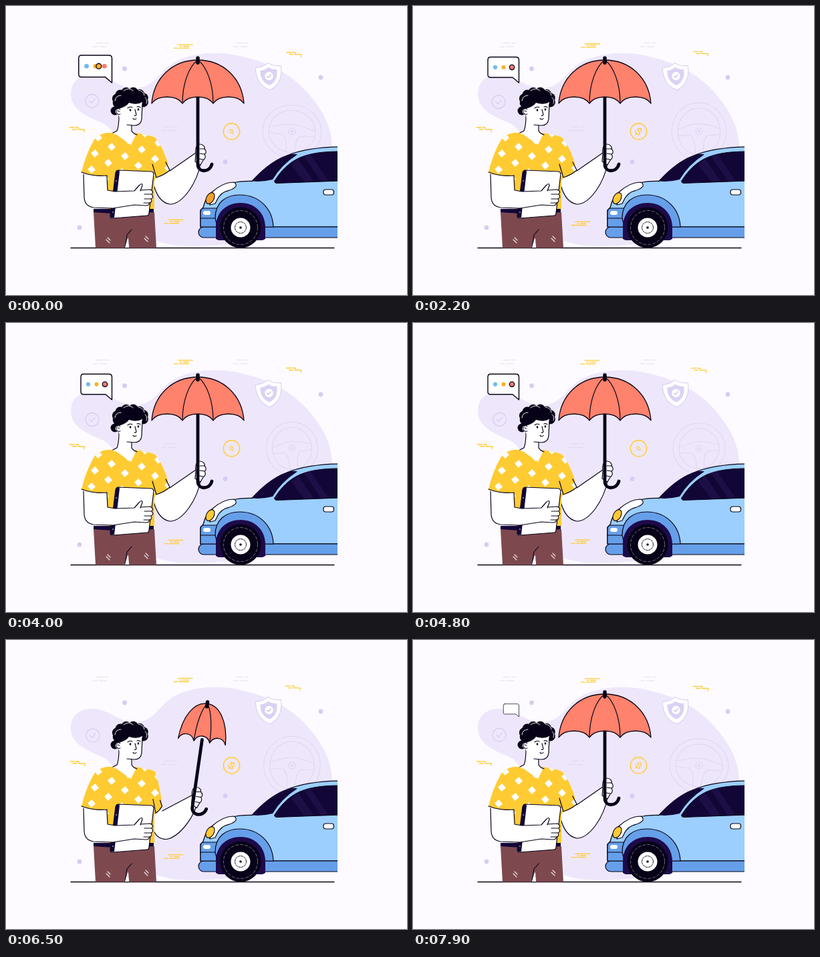
Animation, 600 px wide and 433 px high, one loop 8 s. Source, as an HTML page with a canvas:

```html
<!DOCTYPE html>
<html lang="en">
<head>
<meta charset="utf-8">
<title>Car insurance</title>
<style>
html, body { margin: 0; width: 100%; height: 100%; overflow: hidden; background: #fdfbff; }
canvas { display: block; width: 600px; height: 433px; }
</style>
</head>
<body>
<canvas id="stage"></canvas>
<script>
const W = 600, H = 433, LOOP = 8000, STEP = 100, TAU = Math.PI * 2;
const INK = '#120637', BLACK = '#070217', WHITE = '#fff', SKY = '#9ccffd', BLUE = '#669fe9',
  YELLOW = '#ffcb32', CORAL = '#fe826c', LILAC = '#eee7fb', MAUVE = '#d8ccf2', BROWN = '#7d494f', GREY = '#e2deea';
const canvas = document.getElementById('stage');
const g = canvas.getContext('2d');
const dpr = window.devicePixelRatio || 1;
canvas.width = W * dpr;
canvas.height = H * dpr;

function shape(d, fill, stroke, width = 1.3) {
  const p = d instanceof Path2D ? d : new Path2D(d);
  if (fill) { g.fillStyle = fill; g.fill(p); }
  if (stroke) { g.strokeStyle = stroke; g.lineWidth = width; g.stroke(p); }
}
const line = (d, color = BLACK, width = 1.2) => shape(d, null, color, width);

function oval(x, y, rx, ry, fill, stroke, width, turn = 0) {
  const p = new Path2D();
  p.ellipse(x, y, rx, ry, turn, 0, TAU);
  shape(p, fill, stroke, width);
}
const disc = (x, y, r, fill, stroke, width) => oval(x, y, r, r, fill, stroke, width);

function dashed(x, y, r, color, width, ...dash) {
  g.setLineDash(dash);
  disc(x, y, r, null, color, width);
  g.setLineDash([]);
}

function box(x, y, w, h, r, fill, stroke, width) {
  const p = new Path2D();
  p.roundRect(x, y, w, h, r);
  shape(p, fill, stroke, width);
}

function layer(x, y, turn, draw) {
  g.save();
  g.translate(x, y);
  g.rotate(turn);
  draw();
  g.restore();
}

// Eased 0..1 between two times
function ramp(t, a, b) {
  const k = Math.min(1, Math.max(0, (t - a) / (b - a)));
  return k * k * (3 - 2 * k);
}
const wave = (t, period, shift = 0) => Math.cos((t - shift) / period * TAU);
const mix = (a, b, k) => a + (b - a) * k;

function threeBars(x, y) {
  layer(x, y, 0, () => line('M-8-2.600H14M0 0H8M-5 0H-3M-14 2.600H-8M-6 2.600H8', YELLOW, 1.3));
}
function stepBars(x, y) {
  layer(x, y, 0, () => line('M-11-3H-4M-2-3H2V0H11V3.500M-7 0H-1', YELLOW, 1.3));
}
function greyBars(x, y, color = GREY) {
  layer(x, y, 0, () => line('M-7-3H3M6-3H11M-12 2.500H-5M-2 2.500H9', color, 1));
}

function background(t) {
  const slow = wave(t, LOOP), lift = 1 - slow;
  g.fillStyle = '#fdfbff';
  g.fillRect(0, 0, W, H);
  shape('M97 132C97 113 111 102 130 103C154 104 166 121 190 123C224 124 228 96 254 83' +
    'C285 68 326 67 358 77C405 87 440 112 462 143C478 164 488 186 488 212V300C450 350 330 362 260 359' +
    'C215 356 185 335 176 290C170 240 176 194 146 176C118 165 97 154 97 132Z', LILAC);
  [[177.5, 94], [471, 107], [328, 233.5], [110, 332]].forEach(([x, y]) => disc(x, y, 3.4, MAUVE));

  const sway = -2 + 1.7 * wave(t, 2000);
  threeBars(265.5 + sway * .15, 60.5 - lift);
  threeBars(251 + sway * .1, 323 + lift * 2.5);
  stepBars(431 + sway, 72.5 - lift);
  stepBars(106 - sway * .5, 185);
  greyBars(142, 58.5);
  greyBars(352, 58.5);
  greyBars(245, 184, '#dfd7ee');

  layer(129 - Math.sin(t / LOOP * TAU), 143.5 - 1.2 * slow, 0, () => {
    disc(0, 0, 10, null, MAUVE, 1.2);
    line('M-4 0L-1 3L4-3', MAUVE, 1.2);
  });

  disc(337.5, 188, 12.2, null, YELLOW, 1.4);
  dashed(337.5, 188, 10.5, '#ffdc7d', .6, 1.5, 2);
  layer(337.5, 188, .75, () => {
    g.scale(1, .7 + .3 * wave(t, 5000, 2000));
    line('M3.500-2.500C2-5-4-5-3.500-2C-3 1 4-1 4 2C4 5-3 5-4 2.500M0-6.500V-4M0 4V6.500', YELLOW, 1.4);
  });

  layer(393.5, 105, -.08, () => {
    const d = 'M0-20C6-15 13-14 19-14C20 3 14 15 0 21C-14 15-20 3-19-14C-13-14-6-15 0-20Z';
    shape(d, WHITE, MAUVE, 1);
    g.scale(.66, .66);
    shape(d, '#dcd1f4');
    g.scale(1.5, 1.5);
    disc(0, 0, 6.3, WHITE);
    line('M-3 0L-1 2L3-2', '#c3b6e6', 1.1);
  });

  layer(428, 188, .1 * slow, () => {
    const c = '#e0d7f4', rx = 41.3 + 2.7 * slow, ry = 41 - 3 * wave(t, 4000, 700);
    oval(0, 0, rx, ry, null, c, 1.1);
    oval(0, 0, rx - 9, ry - 8, null, c, 1.1);
    g.scale(rx / 42, ry / 42);
    line('M-32-4C-20-7-12-12 0-11C12-12 20-7 32-4M-32 5L-13 6C-7 10-6 20-6 33M32 5L13 6C7 10 6 20 6 33', c, 1.1);
    disc(0, 0, 5, null, c, 1.2);
    disc(0, 0, 2, c);
  });
}

function car(t) {
  g.save();
  g.beginPath();
  g.rect(0, 0, 496, H);
  g.clip();
  // body
  shape('M500 211C469 211 438 216 418 225C399 233 382 247 368 262.500C345 262 323 267 311 277' +
    'C300 284 297 294 295 302L291 306V331H500Z', SKY, BLACK, 1.3);
  // glass
  shape('M368 262.500C383 245 400 231 417 225Q430 220 436 222.500Q412 238 399 260Q384 264 368 262.500Z', INK);
  shape('M402 262C411 247 424 234 440 227C457 220 477 218 500 218V262L405 265.500Q401 265 402 262Z', INK, BLACK, 1);
  shape('M427 238L437 229L460 262.500L446 263ZM446 225L455 222L482 261.500L471 262Z', '#1d0f46');
  // sill, bumper, front
  shape('M384 331H500V347H384Z', BLUE, BLACK, 1.2);
  box(288, 331, 38, 16, 8, BLUE, BLACK, 1.2);
  shape('M295 303H318V331H291V309Q291 304 295 303Z', BLUE, BLACK, 1.2);
  line('M291 318H314');
  box(295, 307, 11, 6, 3, WHITE);
  // fender and wheel
  shape('M313 318C313 294 329 283 350 283C379 283 399 304 400 331H380L316 330Z', BLUE, BLACK, 1.2);
  shape('M314 349V328C316 307 331 295 351 295C373 295 388 311 388 332V349L384 351H318Z', '#1d0a4a');
  disc(351, 332, 30.5, BLACK);
  dashed(351, 332, 25.5, '#8d879c', .8, 4, 3);
  disc(351, 332, 14.5, WHITE);
  dashed(351, 332, 8.5, BLACK, .9, 3, 1.5);
  disc(351, 332, 1.8, BLACK);
  // lamp
  shape('M308 279C319 269 331 264 340 264Q345 265 344 270C341 275 334 276 328 278C319 282 316 290 313 296L305 298Z',
    WHITE, BLACK, 1.2);
  const phase = t % 1470;
  const lamp = phase >= 1250 ? '#fb2222' : phase < 50 ? '#f3a02c' : '#ffc934';
  oval(305.5, 288, 5.6, 9, lamp, BLACK, 1.1, .5);
  box(475, 275, 15.5, 8, 3.5, WHITE, BLACK, 1.2);
  g.restore();
}

function canopy(sx, sy) {
  const X = x => x * sx, Y = y => -139 + (y - 76) * sy;
  const p = new Path2D();
  p.moveTo(X(-69), Y(146));
  p.bezierCurveTo(X(-66), Y(108), X(-38), Y(81), 0, Y(81));
  p.bezierCurveTo(X(38), Y(81), X(66), Y(108), X(69), Y(146));
  for (let x = 23; x >= -69; x -= 46)
    p.bezierCurveTo(X(x + 37), Y(133), X(x + 9), Y(133), X(x), Y(146));
  p.closePath();
  shape(p, CORAL, BLACK, 1.3);
  for (const s of [-1, 1]) {
    const rib = new Path2D();
    rib.moveTo(0, Y(81));
    rib.bezierCurveTo(X(s * 13), Y(90), X(s * 23), Y(116), X(s * 23), Y(146));
    line(rib);
  }
}

function umbrella(fold) {
  layer(mix(287, 277, fold), mix(215, 242, fold), .286 * fold, () => {
    line('M0-80V22C0 35 18 35 21 22', BLACK, 4.8);
    canopy(mix(1, .035, fold), mix(1, .78, fold));
    line('M0-137V-130', BLACK, 5.5);
  });
}

function grip(fold) {
  layer(mix(0, -11, fold), mix(0, 27, fold), 0, () => {
    shape('M284 222C283 213 285 207 290 207C295 207 298 211 297 214C300 217 300 221 297 222' +
      'C300 226 297 230 295 231L291 238L283 233Z', WHITE, BLACK, 1.2);
    line('M290 214H297M290 221L297 222M289 229L295 230');
  });
}

function raisedArm(f) {
  const m = (a, b) => mix(a, b, f).toFixed(1);
  const top = `${m(245, 223)} ${m(247, 265)}`, hand = `${m(284, 271)} ${m(220, 246)}`;
  const under = `${m(291, 277)} ${m(236, 266)}C${m(286, 268)} ${m(264, 277)} ${m(265, 252)} ${m(297, 293)}` +
    ` ${m(245, 237)} ${m(297, 300)}Q${m(228, 226)} ${m(294, 304)} 221 ${m(268, 304)}`;
  shape(`M${top}L${hand}L${under}L221 258Z`, WHITE);
  line(`M${top}L${hand}M${under}`);
}

function head(open) {
  shape('M169 160L167 187L163 191L187 208L195 192L189 188V176Z', WHITE);
  line('M169 164Q169 180 166 187L160 190M188 179V187Q190 191 196 193');
  // curls around the crown
  oval(185, 140, 18, 14, BLACK);
  for (let a = .36; a <= 1.04; a += .085)
    disc(186 + 20 * Math.cos(a * TAU), 141 + 12 * Math.sin(a * TAU), 7.5, BLACK);
  disc(163, 157, 6.5, BLACK);
  shape('M169 154Q180 151 184 145Q196 149 204 144L203 168Q203 179 190 179Q174 177 169 165Z', WHITE);
  line('M204 146L203 169Q202 179 192 179L181 178');
  disc(168, 158, 4.3, WHITE);
  line('M171 155C166 151 163 158 167 162Q169 163 171 162M167 157L170 158', BLACK, 1);
  line('M163 142Q164 134 172 134M176 127Q184 121 190 127M198 126Q206 127 207 134M208 137Q212 140 210 146', WHITE, .9);
  // face
  const y = 2 * (1 - open);
  layer(0, y, 0, () => line('M182 153Q185 150 189 152M196 151Q199 150 201 152', BLACK, 1.1));
  if (open > .4) {
    oval(186, 156, 1.3, 1.8 * open, BLACK);
    oval(198, 155, 1.3, 1.8 * open, BLACK);
  } else line('M183 157Q186 159 189 157M196 156Q198 158 201 156', BLACK, 1);
  line('M193 155L195 163Q194 165 192 164M190 168.500Q193 171.500 195 168.500', BLACK, 1.1);
}

function shirt(f) {
  const m = (a, b) => mix(a, b, f).toFixed(1);
  const cuff = `L${m(225, 223)} ${m(257, 262)}Q${m(237, 223)} ${m(253, 258)} ${m(245, 222)} ${m(246, 252)}`;
  const p = new Path2D('M151 190Q137 192 131 202Q119 223 113 249Q131 256 151 254L153 304H222V262' + cuff +
    `Q${m(237, 225)} ${m(214, 224)} 223 197Q214 193 193 190L187 208L162 190Z`);
  shape(p, YELLOW);
  g.save();
  g.clip(p);
  g.fillStyle = WHITE;
  for (let i = -2; i < 5; i++)
    for (let j = -2; j < 5; j++)
      layer(133 + 25 * i + 20 * j, 221 - 10 * i + 14 * j, .85, () => g.fillRect(-4.2, -4.2, 8.4, 8.4));
  g.restore();
  line('M113 249Q131 256 151 254V275');
  line(`M${m(219, 221)} ${m(237, 240)}` + cuff + `L${m(239, 222)} ${m(234, 246)}`);
}

function legs() {
  shape('M131 309H222L225 362.500H184L183 347L178 362.500H134Z', BROWN);
  line('M188 335L181 343L178 362', BLACK, 1.1);
  shape('M182 348L184 362H178Z', '#fdfbff');
  line('M150 350L155 355M152 347L156 351M207 348L212 353M209 345L213 349', '#f2e8ec', 1.1);
  shape('M131 304L221 304V309Q175 313 131 309Z', INK);
}

function nearArm() {
  // clipboard
  shape('M168 246Q165 246 164 250L156 314Q156 318 160 318L211 314Q214 314 214 310L221 252Q221 249 218 248Z', WHITE, BLACK, 1.2);
  shape('M169 246Q165 246 164 250L156 314Q156 318 162 317L170 248Z', INK);
  disc(165, 262, .8, WHITE);
  disc(160, 309, .8, WHITE);
  // forearm and hand
  shape('M116 252L117 287Q118 300 130 302L160 303L192 299L210 299Q215 299 215 295Q220 294 218 289Q222 286 218 282' +
    'Q222 278 216 275H202L204 269Q204 265 200 268L192 277L163 278L152 276V255Q132 256 116 252Z', WHITE);
  line('M116 252L117 287Q118 300 131 302L160 303L192 298L209 299Q215 299 214 295M151 255L152 276L163 278L192 277' +
    'L199 269Q204 264 204 269L201 277M201 276L216 275Q222 278 218 282H207M218 282Q222 287 217 289H207M217 289Q220 294 214 295H206');
}

function bubble(t) {
  const s = 1 + .07 * (1 - ramp(t, 0, 200)) - 1.07 * ramp(t, 5900, 6200) + ramp(t, 7800, 8000);
  const size = t < 5900 ? s : Math.min(1, s + .07 * ramp(t, 5900, 6200));
  if (size < .05) return;
  g.save();
  g.translate(158.5, 115);
  g.scale(size, size);
  g.translate(-158.5, -115);
  shape('M116 76.500H154Q158.500 76.500 158.500 81V115L149 107H116Q112 107 112 103V81Q112 76.500 116 76.500Z',
    WHITE, BLACK, 1.4);
  if (size > .6) {
    const colors = ['#70b9f2', '#fbb02f', '#f77b6c'];
    colors.forEach((c, i) => disc(123 + 12.5 * i, 91.8, 3.1, c));
    const u = (t + 150) % 2700;
    const pos = 2 - 2 * ramp(u, 0, 400) + ramp(u, 650, 850) + ramp(u, 1050, 1350);
    disc(123 + 12.5 * pos, 91.8, 3.7, colors[Math.round(pos)], BLACK, 1.3);
  }
  g.restore();
}

function draw(t) {
  g.setTransform(dpr, 0, 0, dpr, 0, 0);
  g.lineCap = g.lineJoin = 'round';
  const fold = ramp(t, 6300, 6700) - ramp(t, 7200, 7600);
  const open = 1 - ramp(t, 1100, 1200) + ramp(t, 1400, 1500);
  background(t);
  car(t);
  line('M97 362.500H491', BLACK, 1.4);
  legs();
  raisedArm(fold);
  grip(fold);
  umbrella(fold);
  shirt(fold);
  head(open);
  nearArm();
  bubble(t);
}

function frame() {
  draw(Math.floor(performance.now() % LOOP / STEP) * STEP);
  requestAnimationFrame(frame);
}
frame();
</script>
</body>
</html>
```
